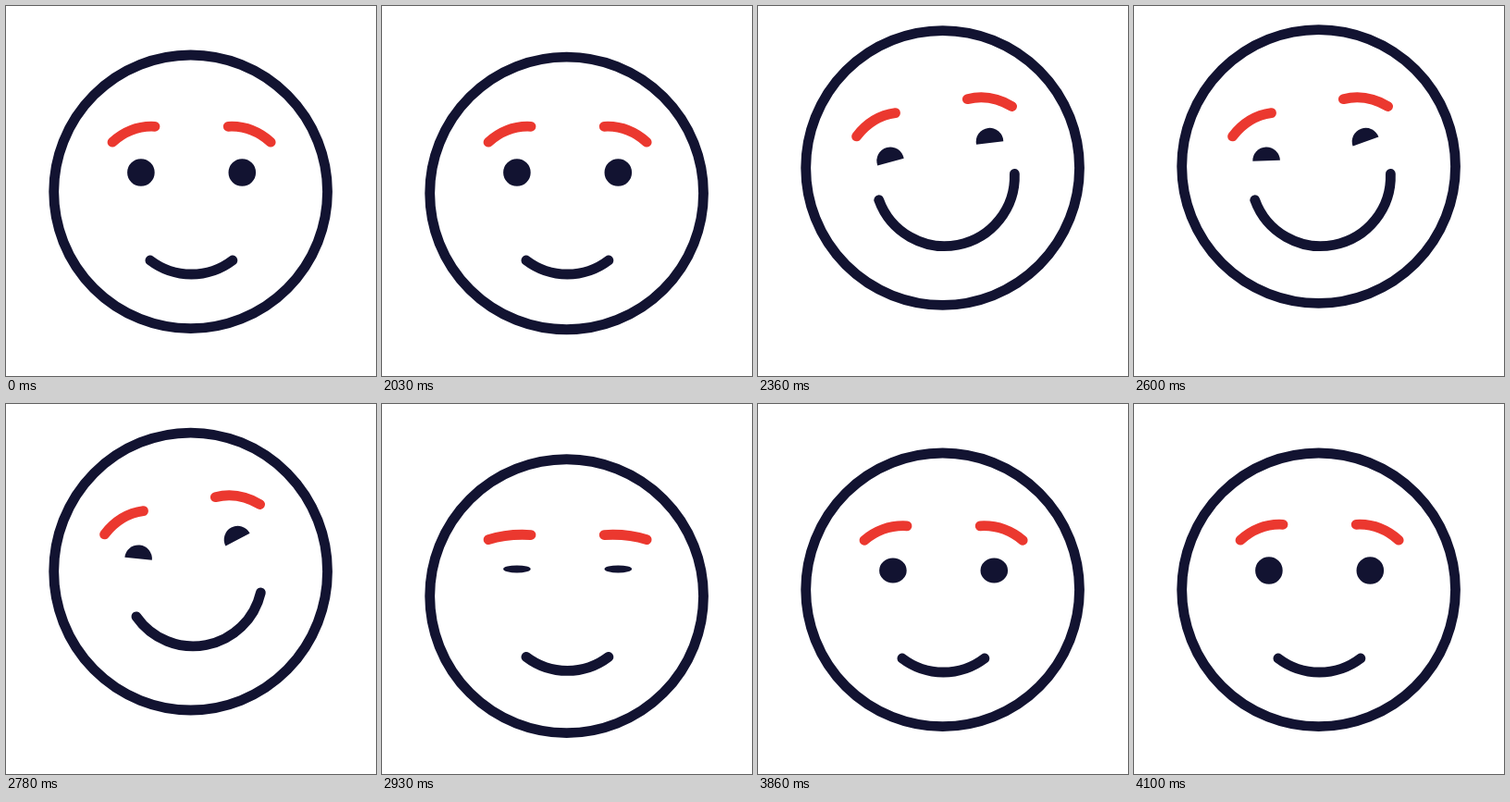
These frames come from a looping animation (400 by 400 pixels, 5.18 s). An HTML page:

```html
<!DOCTYPE html>
<html lang="en">
<head>
<meta charset="utf-8">
<title>Smile</title>
<style>
  html, body { margin: 0; width: 100%; height: 100%; overflow: hidden; background: #fff; }
  svg { display: block; width: 100vw; height: 100vh; }
  .line { fill: none; stroke: #121331; stroke-width: 10.8; stroke-linecap: round; }
  .brow { stroke: #eb382f; }
  .eye { fill: #121331; }
</style>
</head>
<body>
<svg viewBox="0 0 400 400">
  <ellipse id="face" class="line" cx="199.6" rx="147.9"/>
  <g id="features">
    <g transform="translate(200.6 0)">
      <path class="line brow"/><path class="eye"/>
    </g>
    <g transform="translate(200.6 0) scale(-1 1)">
      <path class="line brow"/><path class="eye"/>
    </g>
    <path id="mouth" class="line"/>
  </g>
</svg>
<script>
const LOOP = 5180, TICK = 30, HOP_START = 2030, BLINK_START = 3830;
const FACE_TOP = 53, FACE_BOTTOM = 348.7;

const $ = selector => document.querySelector(selector);
const $$ = selector => document.querySelectorAll(selector);
const mix = (a, b, p) => a + (b - a) * p;
const rad = degrees => degrees * Math.PI / 180;
const ease = p => (1 - Math.cos(Math.PI * p)) / 2;

// Eased step from 0 to 1, and a plateau that rises and falls again.
const ramp = (t, from, to) => ease(Math.min(1, Math.max(0, (t - from) / (to - from))));
const hold = (t, up, top, down, end) => ramp(t, up, top) - ramp(t, down, end);

const blinkAt = t => hold(t, 0, 4.5, 4.5, 9);

// Crouch, leap, land, rebound.
const hop = t =>
  7 * ramp(t, -1.5, 2.5) - 34.4 * hold(t, 2.5, 12, 23.1, 30.4)
  - 9.4 * ramp(t, 30.4, 36) + 2.4 * ramp(t, 36, 40);

// Arc around a vertical axis, spreading to both sides of "middle" (degrees).
function arc(x, y, r, middle, half) {
  const at = a => `${x + r * Math.cos(rad(a))} ${y + r * Math.sin(rad(a))}`;
  return `M${at(middle - half)}A${r} ${r} 0 0 1 ${at(middle)}A${r} ${r} 0 0 1 ${at(middle + half)}`;
}

function drawFace(t) {
  // The leading edge moves first, so the face stretches along its path.
  const top = FACE_TOP + hop(t);
  const bottom = FACE_BOTTOM + hop(t < 18 ? t - 0.5 : t + 0.7);
  $('#face').setAttribute('cy', (top + bottom) / 2);
  $('#face').setAttribute('ry', (bottom - top) / 2);
}

function drawEyes(t, blink) {
  const drop = 13.2 * blink;
  const brow = `M-85.6 ${147.2 + blink}Q-65 ${128.8 + drop} -39.6 ${130.3 + drop}`;
  $$('.brow').forEach(el => el.setAttribute('d', brow));

  const lid = 180 - 90 * hold(t, 4, 12.3, 25, 29);
  const tilt = -4 * ramp(t, 4, 11) + 21 * ramp(t, 11, 25) - 17 * ramp(t, 25, 30);
  const eye = arc(0, 0, 14.8, -90, lid) + 'Z';
  const pose = `translate(-54.7 180) scale(1 ${1 - 0.75 * blink}) rotate(${tilt})`;
  $$('.eye').forEach(el => {
    el.setAttribute('d', eye);
    el.setAttribute('transform', pose);
  });
}

function drawMouth(t) {
  const smile = hold(t, 2, 11, 21.7, 30);
  $('#mouth').setAttribute('d', arc(200.4,
    mix(216.5, 207.5, smile), mix(73.5, 75.6, smile), 90, mix(37.3, 81, smile)));
}

function draw(ms) {
  const t = Math.floor((ms - HOP_START) / TICK);
  const late = Math.floor((ms - BLINK_START) / TICK);
  const shift = -23.3 * hold(t, 2, 11, 25, 31);
  const turn = -10.9 * hold(t, 2, 11, 25, 30);
  $('#features').setAttribute('transform', `translate(0 ${shift}) rotate(${turn} 200 200)`);
  drawFace(t);
  drawEyes(t, blinkAt(t) + blinkAt(t - 25) + blinkAt(late));
  drawMouth(t);
}

const start = performance.now();
function frame() {
  draw((performance.now() - start) % LOOP);
  requestAnimationFrame(frame);
}
frame();
</script>
</body>
</html>
```
